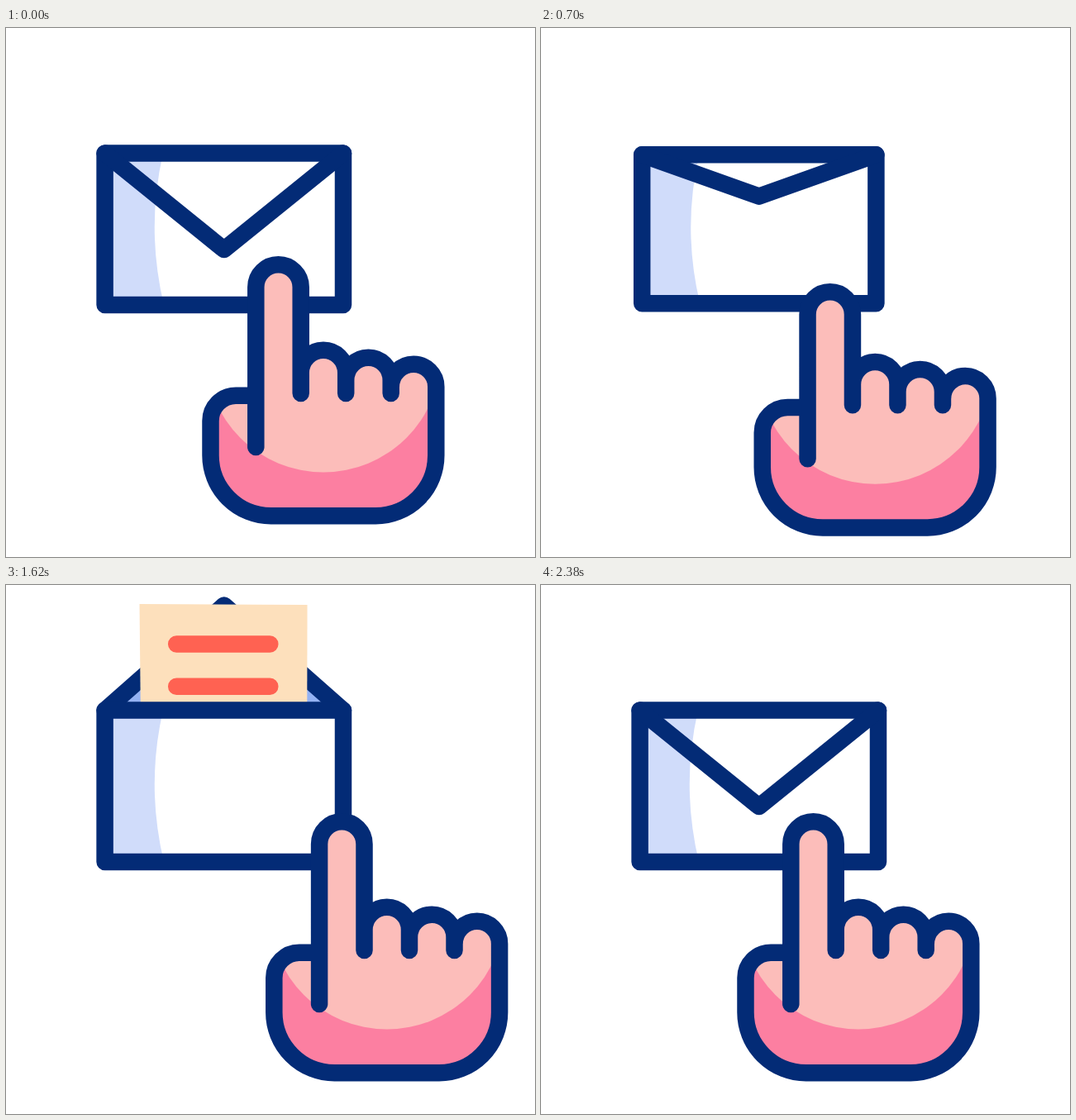
Animation of 640 by 640 pixels, one loop 2.4 s. Source, as an HTML page:

```html
<!DOCTYPE html>
<html lang="en">
<head>
<meta charset="utf-8">
<title>Open the letter</title>
<style>
  html, body { margin: 0; width: 100%; height: 100%; overflow: hidden; background: #fff; }
  svg { display: block; width: 100vw; height: 100vh; }
  .line { fill: none; stroke: #032b76; stroke-linecap: round; stroke-linejoin: round; }
</style>
</head>
<body>
<svg viewBox="0 0 640 640">
  <defs>
    <clipPath id="flapClip"><rect id="flapBox" x="90" y="0" width="350" height="640"/></clipPath>
    <clipPath id="palmClip"><path id="palmShape"/></clipPath>
  </defs>

  <g id="mail">
    <g id="openFlap" clip-path="url(#flapClip)">
      <path id="openPath" class="line" style="fill:#94b2f3"/>
    </g>
    <g id="letter">
      <path id="paper" fill="#fde0bc"/>
      <path d="M206.2 70.5H319.3M206.2 121.8H319.3" fill="none" stroke="#ff6252"
            stroke-width="20.5" stroke-linecap="round"/>
    </g>
    <path d="M119.6 151.6H408V335H119.6Z" fill="#fff"/>
    <path d="M119.6 151.6H190Q169 243 191 335H119.6Z" fill="#d0dcfa"/>
    <path d="M119.6 151.6H408V335H119.6Z" class="line"/>
    <path id="shutPath" class="line"/>
  </g>

  <g id="hand">
    <g clip-path="url(#palmClip)">
      <rect x="230" y="260" width="310" height="350" fill="#fc7fa1"/>
      <circle cx="384" cy="395.5" r="142" fill="#fcbdba"/>
    </g>
    <path id="handLine" class="line" stroke-width="20.5"/>
  </g>
</svg>
<script>
const LOOP = 2400, STROKE = 20.5;
const CX = 263.8, CY = 243.3, HINGE = 151.6;
const el = id => document.getElementById(id);
const set = (id, name, value) => el(id).setAttribute(name, value);

// Smooth 0..1 ramp between two times
function ramp(t, from, to) {
  const u = Math.min(1, Math.max(0, (t - from) / (to - from)));
  return u * u * (3 - 2 * u);
}

const arc = (dx, dy, r) => `a${r} ${r} 0 0 1 ${dx} ${dy}`;
const palm = 'V517' + arc(-73, 73.2, 73.1) + 'H320.5' + arc(-73, -73.2, 73.1) +
             'V475.5' + arc(30.5, -30.7, 30.6) + 'H302.3';

function drawHand(dx, press) {
  const tip = 313.5 + 25.5 * press;
  const finger = `V${tip}` + arc(54.4, 0, 27.2);
  const bump = arc(54.5, 0, 27.25);
  set('handLine', 'd', 'M302.3 507' + finger + 'V442' +
    'M356.7 417' + bump + 'V442M411.2 426' + bump + 'V442M465.8 434' + bump + palm);
  set('palmShape', 'd', 'M302.3 445' + finger +
    'V417' + bump + 'V426' + bump + 'V434' + bump + palm + 'Z');
  set('hand', 'transform', `translate(${dx} ${19.3 * press})`);
}

function drawMail(open, squeeze, drop) {
  const k = 1 - 0.0365 * squeeze;
  set('mail', 'transform', `translate(${CX} ${CY}) scale(${k}) translate(${-CX} ${-CY})`);
  set('mail', 'stroke-width', STROKE / k);

  const rise = -116.4 + 243.5 * open + 1.8 * squeeze;
  const flap = `M119.6 ${HINGE}L${CX} ${HINGE - rise}L408 ${HINGE}`;
  const up = rise > 0;
  set('openFlap', 'display', up ? 'inline' : 'none');
  set('shutPath', 'display', up ? 'none' : 'inline');
  set('openPath', 'd', flap);
  set('shutPath', 'd', flap);
  set('flapBox', 'y', HINGE - 1.0656 * rise - 3);

  // The paper leans a little to the right while it is low
  const lean = Math.min(1.7, drop * 0.031);
  set('paper', 'd', `M${161.5 + lean} 22L${364.5 + lean} 23L${364.2 + lean} 172H${163 + lean}Z`);
  set('letter', 'transform', `translate(0 ${drop})`);
  set('letter', 'display', drop < 124.9 ? 'inline' : 'none');
}

function draw(t) {
  const down = ramp(t, 100, 600), go = ramp(t, 600, 900), back = ramp(t, 2000, 2380);
  const away = go - back;
  const out = ramp(t, 860, 1300) - ramp(t, 1600, 2000);
  drawHand(76.8 * away, down - go);
  drawMail(away, down - ramp(t, 600, 800), 125 * (1 - out));
}

const start = performance.now();
function tick() {
  draw((performance.now() - start) % LOOP);
  requestAnimationFrame(tick);
}
draw(0);
requestAnimationFrame(tick);
</script>
</body>
</html>
```
